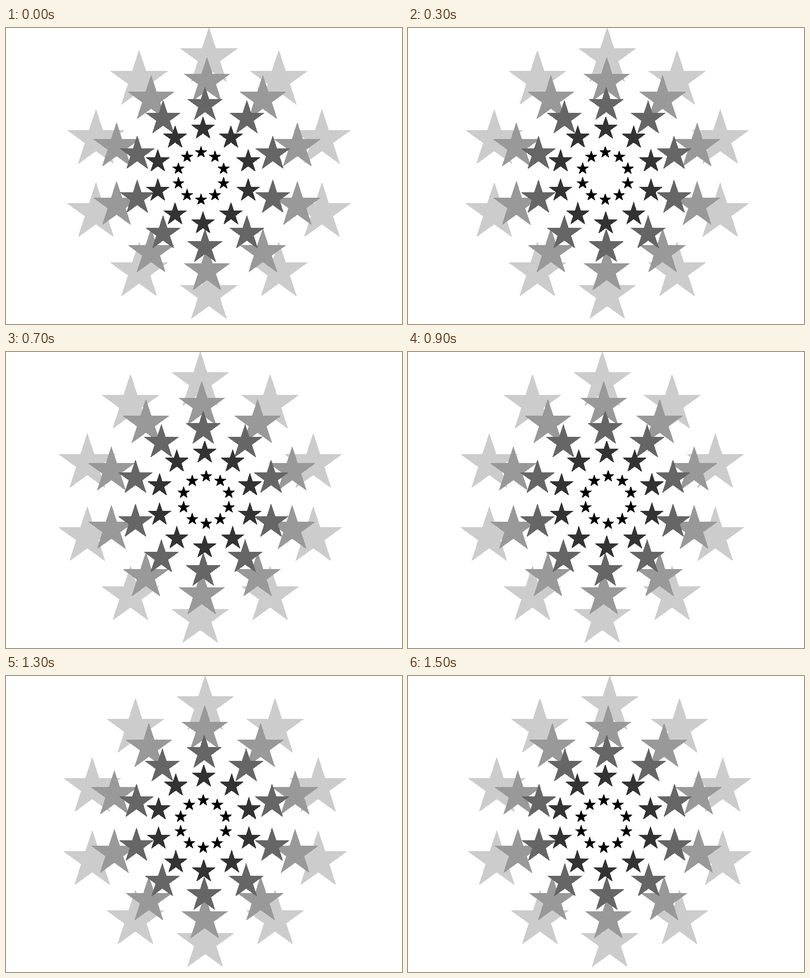
These frames come from a looping animation (800 px wide and 600 px high, 1600 ms). An HTML page:

```html
<!DOCTYPE html>
<html lang="en">
<head>
<meta charset="utf-8">
<title>Swaying star rings</title>
<style>
  html, body { margin: 0; width: 100%; height: 100%; overflow: hidden; background: #fff; }
  svg { display: block; width: 800px; height: 600px; }
</style>
</head>
<body>
<svg viewBox="0 0 800 600" shape-rendering="crispEdges"></svg>
<script>
const LOOP = 1600, STEP = 100, SWAY = 10;
const HALF = 0.5;   // half a pixel
const NUDGE = 0.02; // keeps edges off exact pixel centres
const svg = document.querySelector('svg');
const polar = (radius, turn) => [
  radius * Math.sin(turn * 2 * Math.PI),
  -radius * Math.cos(turn * 2 * Math.PI)
];

// Pentagram grown by half a pixel each way, so every pixel it touches is filled:
// four shifted copies, plus a one-pixel square on each tip.
function starPath(cx, cy, size) {
  const corners = [0, 2, 4, 1, 3].map(i => {
    const [x, y] = polar(size, i / 5);
    return [cx + x, cy + y];
  });
  const shifted = (dx, dy) => corners.map(([x, y]) => `${(x + dx).toFixed(3)} ${(y + dy).toFixed(3)}`);
  let d = shifted(-HALF, -HALF).map(p => `M${p}h1v1h-1Z`).join('');
  for (const dx of [-HALF, HALF]) {
    for (const dy of [-HALF, HALF]) d += `M${shifted(dx, dy).join('L')}Z`;
  }
  return d;
}

// Largest ring first, so the darker inner rings lie on top.
const rings = [5, 4, 3, 2, 1].map(level => {
  const path = document.createElementNS('http://www.w3.org/2000/svg', 'path');
  const shade = (level - 1) * 51;
  let d = '';
  for (let i = 0; i < 10; i++) d += starPath(...polar(48 * level, i / 10), 12 * level);
  path.setAttribute('d', d);
  path.setAttribute('fill', `rgb(${shade},${shade},${shade})`);
  svg.append(path);
  return { path, depth: (level - 2.5) * 0.4 };
});

function draw() {
  const time = Math.floor(performance.now() % LOOP / STEP) * STEP;
  const sway = SWAY * (Math.abs(time - LOOP / 2) / (LOOP / 4) - 1);
  for (const { path, depth } of rings) {
    path.setAttribute('transform', `translate(${400 + sway * depth + NUDGE} ${300 + NUDGE})`);
  }
  requestAnimationFrame(draw);
}
draw();
</script>
</body>
</html>
```
